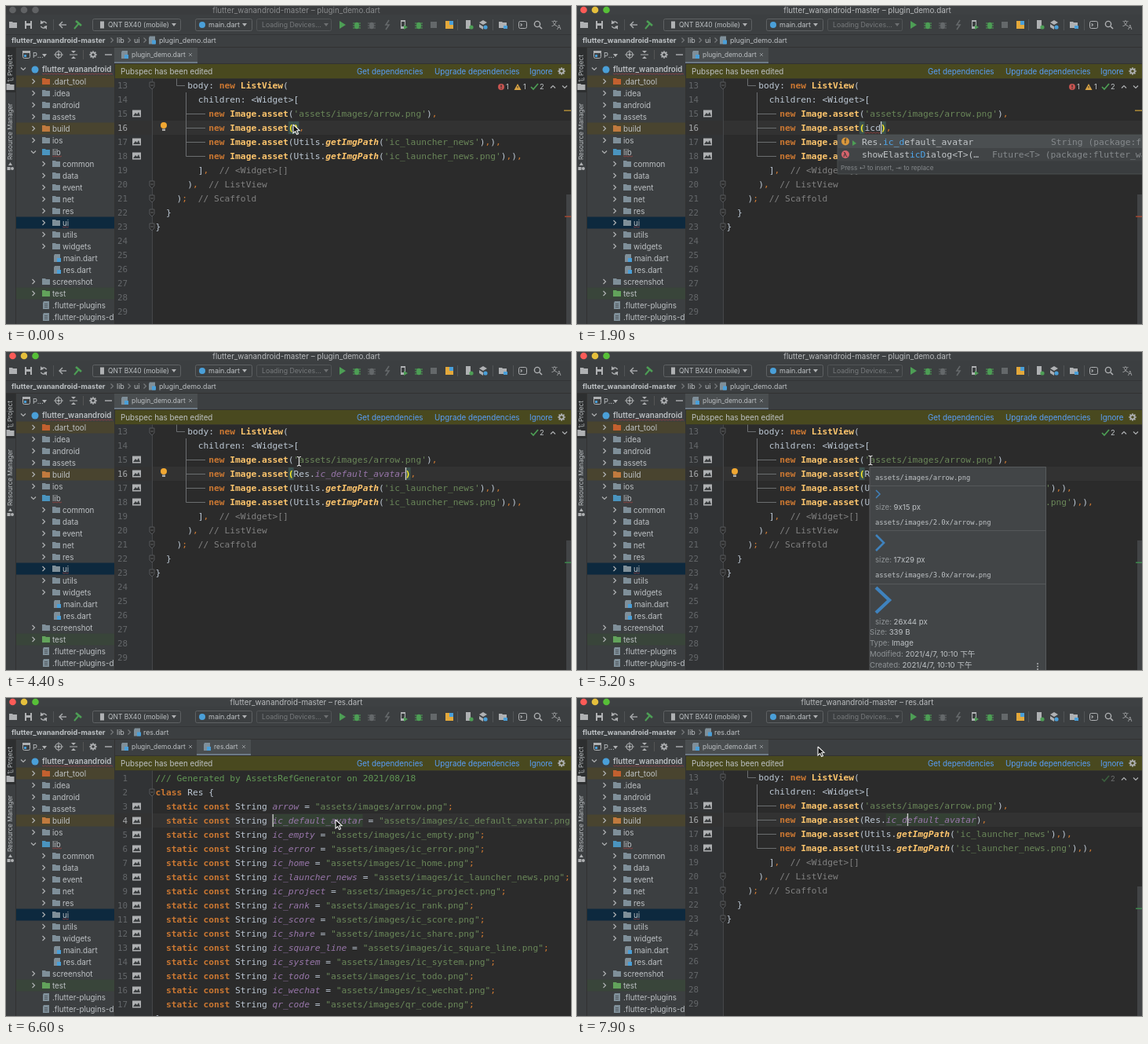
These frames come from a looping animation (720 px wide and 405 px high, 8000 ms). An HTML page with a canvas:

```html
<!DOCTYPE html>
<html lang="en">
<head>
<meta charset="utf-8">
<title>Editor demo</title>
<style>
html, body { margin: 0; width: 100%; height: 100%; overflow: hidden; background: #2b2b2b; }
canvas { display: block; }
</style>
</head>
<body>
<canvas id="stage" width="720" height="405"></canvas>
<script>
const g = document.getElementById('stage').getContext('2d');
const UI = 'Inter, "Liberation Sans", sans-serif';
const MONO = '"DejaVu Sans Mono", "Liberation Mono", monospace';
const CODE = 11.25, CW = 6.773, LEFT = 190.5;
const PANEL = '#3c3f41', TEXT = '#bdc1c4', DIM = '#8b8f92', ICON = '#afb1b3';
const BLUE = '#4a9fd8', GREEN = '#4d9e55', PLAIN = '#bcc7d3';

// moments of the session, in ms
const ACTIVE = 300, KEYS = [1500, 1650, 1800], ACCEPT = 2200, CHECKED = 3700;
const DOC_IN = 4800, DOC_OUT = 5450, OPEN = 6200, CLOSE = 7700, LOOP = 8000;

const MOUSE = [[0, 366, 151], [500, 366, 155], [3900, 366, 155], [4500, 374, 138],
  [5450, 374, 138], [5900, 420, 155], [6800, 420, 155], [7400, 303, 60], [7700, 303, 60], [7900, 307, 62]];

function rect(x, y, w, h, c) { g.fillStyle = c; g.fillRect(x, y, w, h); }
function box(x, y, w, h, c, fill) {
  g.beginPath(); g.roundRect(x, y, w, h, 2);
  if (fill) { g.fillStyle = fill; g.fill(); }
  g.strokeStyle = c; g.lineWidth = 1; g.stroke();
}
function dot(x, y, r, c) { g.fillStyle = c; g.beginPath(); g.arc(x, y, r, 0, 7); g.fill(); }
function ring(x, y, r, c, w = 1.2) {
  g.strokeStyle = c; g.lineWidth = w; g.beginPath(); g.arc(x, y, r, 0, 7); g.stroke();
}
function trace(p) {
  g.beginPath();
  for (let i = 0; i < p.length; i += 2) g.lineTo(p[i], p[i + 1]);
}
function line(p, c, w = 1) { trace(p); g.strokeStyle = c; g.lineWidth = w; g.stroke(); }
function poly(p, c) { trace(p); g.fillStyle = c; g.fill(); }
function text(s, x, y, size = 9.8, c = TEXT, style = '', align = 'left', family = UI) {
  g.font = `${style} ${size}px ${family}`;
  g.textAlign = align;
  g.fillStyle = c;
  g.fillText(s, x, y + size * .36);
}
function mono(s, x, y, c, size = CODE, style = '', align = 'left') { text(s, x, y, size, c, style, align, MONO); }
function wave(x, y, w) {
  const p = [];
  for (let i = 0; i <= w; i += 2) p.push(x + i, y + (i % 4 ? 1 : 0));
  line(p, '#9a4340', .8);
}
function chevron(x, y, r, c, dir = 'right') {
  const h = r / 2;
  line({ right: [x - h, y - r, x + h, y, x - h, y + r], down: [x - r, y - h, x, y + h, x + r, y - h],
    up: [x - r, y + h, x, y - h, x + r, y + h] }[dir], c, 1.2);
}
function arrowDown(x, y) { poly([x - 3, y - 2, x + 3, y - 2, x, y + 2], ICON); }
function folder(x, y, c = '#7f8f99') {
  poly([x - 5, y - 4, x - 1, y - 4, x, y - 3, x + 5, y - 3, x + 5, y + 4, x - 5, y + 4], c);
}
function file(x, y, c) {
  poly([x - 3, y - 5, x + 4, y - 5, x + 4, y + 5, x - 4, y + 5, x - 4, y - 3], '#7f8f99');
  if (c) rect(x, y, 5, 5, c);
  else for (let i = -2; i < 4; i += 2) rect(x - 2, y + i, 4, .8, '#4a5055');
}
function cross(x, y) {
  line([x - 2, y - 2, x + 2, y + 2], DIM);
  line([x + 2, y - 2, x - 2, y + 2], DIM);
}
function gear(x, y) {
  for (let i = 0; i < 8; i++) {
    const a = i * Math.PI / 4, u = Math.cos(a), v = Math.sin(a);
    line([x + 3 * u, y + 3 * v, x + 4.8 * u, y + 4.8 * v], ICON, 1.6);
  }
  ring(x, y, 2.7, ICON, 1.8);
}
function bug(x, y, c) {
  g.fillStyle = c; g.beginPath(); g.ellipse(x, y + 1, 3, 4.2, 0, 0, 7); g.fill();
  for (const d of [-2, 1, 4]) line([x - 5, y + d, x + 5, y + d], c);
}
function picture(y) {
  rect(161, y - 4.5, 11, 9, ICON);
  poly([162, y + 3, 165, y - 1, 167, y + 1, 169, y - 2, 171, y + 3], '#3a3d3f');
}

function titleBar(t) {
  const on = t >= ACTIVE;
  rect(0, 0, 720, 405, PANEL);
  rect(0, 0, 720, 11, on ? '#3e4143' : '#3a3c3e');
  ['#fc5b57', '#e5bf3c', '#57c038'].forEach((c, i) => dot(8.5 + i * 14.5, 5, 4.3, on ? c : '#606264'));
  const name = t < OPEN ? 'plugin_demo.dart' : 'res.dart';
  text(`flutter_wanandroid-master – ${name}`, 370, 5.5, 9.8, on ? '#b9bbbd' : '#898b8d', '', 'center');
}

function toolbar() {
  folder(9, 24, ICON);
  rect(24, 19, 9, 10, ICON); rect(26, 19, 5, 3, PANEL); rect(26, 25, 5, 4, PANEL);
  g.strokeStyle = ICON; g.lineWidth = 1.4;
  for (const a of [.3, 3.44]) { g.beginPath(); g.arc(48, 24, 4, a, a + 2.4); g.stroke(); }
  poly([44, 18, 44, 23, 48, 22], ICON); poly([52, 30, 52, 25, 48, 26], ICON);
  line([77, 24, 68, 24], ICON, 1.3); line([72, 20, 68, 24, 72, 28], ICON, 1.3);
  line([87, 29, 93, 22], GREEN, 2); line([89, 19, 96, 25], GREEN, 2.6);
  for (const x of [60, 575, 620, 646]) rect(x, 17, 1, 14, '#515456');
  box(110.5, 16.5, 112, 15, '#5e6163'); rect(120, 19.5, 5, 9, ICON);
  text('QNT BX40 (mobile)', 130, 24, 8.5); arrowDown(214, 24);
  box(241.5, 16.5, 72, 15, '#5e6163'); dot(250, 24, 4, BLUE);
  text('main.dart', 258, 24, 9); arrowDown(304, 24);
  box(319.5, 16.5, 95, 15, '#515456'); text('Loading Devices...', 326, 24, 8.7, '#777a7c');
  poly([405, 22, 411, 22, 408, 26], '#6d7072');
  poly([425, 19, 433, 24, 425, 29], GREEN);
  bug(447, 24, GREEN);
  const grey = '#64686a';
  bug(466, 24, grey); line([488, 18, 484, 24, 488, 24, 484, 30], grey, 1.6);
  rect(503, 18, 6, 11, ICON); rect(504, 20, 4, 6, PANEL); poly([507, 24, 512, 27, 507, 30], GREEN);
  bug(526, 24, GREEN); rect(541, 20, 8, 8, grey);
  rect(560, 19, 10, 10, '#e3a83b'); rect(565, 19, 5, 5, BLUE);
  rect(586, 18, 6, 11, ICON); dot(593, 27, 2.6, GREEN);
  poly([608, 18, 613, 21, 608, 24, 603, 21], ICON); poly([603, 23, 608, 26, 608, 30, 603, 27], ICON); dot(611, 27, 2.6, BLUE);
  folder(633, 24, ICON); rect(634, 25, 5, 4, BLUE);
  box(653.5, 19.5, 10, 9, ICON); chevron(656.5, 24, 1.7, ICON);
  ring(677, 23, 3.6, ICON, 1.4); line([680, 26, 683, 29], ICON, 1.6);
  text('文', 695, 22, 8, ICON, '', 'left', '"Noto Sans CJK SC", "Noto Sans CJK", sans-serif');
  text('A', 702, 27, 8, ICON);
}

function breadcrumbs(t) {
  const pathChevron = x => chevron(x, 43.5, 3, '#777a7c');
  rect(0, 36, 720, 1, '#333537');
  text('flutter_wanandroid-master', 7, 43.5, 9.1, TEXT, 'bold');
  text('lib', 141, 43.5, 9);
  [135, 157].forEach(pathChevron);
  if (t < OPEN) {
    text('ui', 163, 43.5, 9);
    pathChevron(177);
    file(186, 43.5, BLUE); text('plugin_demo.dart', 195, 43.5, 8.9);
  } else {
    file(167, 43.5, BLUE); text('res.dart', 175, 43.5, 8.9);
  }
  rect(0, 52, 720, 1, '#323232');
}

function sideStripe() {
  rect(0, 53, 12, 57, '#2d2f30');
  rect(12, 53, 1, 352, '#323232');
  for (const [s, y] of [['1: Project', 97], ['Resource Manager', 196]]) {
    g.save(); g.translate(5.5, y); g.rotate(-Math.PI / 2); text(s, 0, 0, 8.1); g.restore();
  }
  rect(8.5, 91, .7, 4, TEXT);
  folder(5.5, 103, ICON);
  poly([5.5, 199, 8, 203, 3, 203], ICON); rect(1.5, 205, 4, 4, ICON); dot(8, 207, 2, ICON);
}

const TREE = `.dart_tool .idea android assets build ios lib
common data event net res ui utils widgets main.dart res.dart
screenshot test .flutter-plugins .flutter-plugins-d`.split(/\s+/);
const ROW_TINT = { '.dart_tool': '#49442f', build: '#49442f', ui: '#0d293e', test: '#39453a' };
const FOLDER_TINT = { '.dart_tool': '#c2602f', build: '#c07a3e', lib: '#4a94bf', test: '#62a35b' };

function projectTree() {
  box(21.5, 57.5, 9, 9, ICON); rect(21, 57, 10, 3, ICON); rect(23, 62, 3, 3, BLUE);
  text('P...', 34, 62.5, 9.4); arrowDown(49, 63);
  ring(67, 62, 4, ICON); dot(67, 62, 1.4, ICON);
  line([67, 56, 67, 68], ICON, .8); line([61, 62, 73, 62], ICON, .8);
  line([81, 62, 91, 62], ICON); poly([83, 57, 89, 57, 86, 60], ICON); poly([83, 67, 89, 67, 86, 64], ICON);
  rect(98, 56, 1, 12, '#555'); gear(111, 62); line([126, 62, 135, 62], ICON, 1.4);
  g.save(); g.beginPath(); g.rect(13, 72, 125, 333); g.clip();
  chevron(22, 80, 3, ICON, 'down'); dot(37, 81, 4.5, BLUE);
  text('flutter_wanandroid', 46, 81, 9.7, TEXT, '600'); wave(46, 86, 91);
  TREE.forEach((name, i) => {
    const y = 96 + i * 15, deep = i > 6 && i < 17, leaf = /main|res\.|flutter/.test(name);
    if (ROW_TINT[name]) rect(13, y - 7.5, 125, 15, ROW_TINT[name]);
    if (leaf) file(deep ? 65 : 51, y, deep && BLUE);
    else {
      chevron(deep ? 48 : 35, y, 3, ICON, name === 'lib' ? 'down' : 'right');
      folder(deep ? 64 : 51, y, FOLDER_TINT[name]);
    }
    text(name, leaf && deep ? 73 : deep ? 72 : 59, y, 9.8);
    if (name === 'lib') wave(59, y + 5, 12);
    if (name === 'ui') wave(72, y + 5, 9);
  });
  g.restore();
}

function tabs(both) {
  const tab = (x, w, name, on) => {
    if (on) { rect(x, 53, w, 20, '#4a4e50'); rect(x, 71, w, 2, '#6d7a86'); }
    file(x + 13, 62, BLUE); text(name, x + 22, 62, 8.4); cross(x + w - 9, 62);
  };
  rect(138, 53, 1, 352, '#323232');
  tab(138, 106, 'plugin_demo.dart', !both);
  if (both) tab(243, 69, 'res.dart', true);
  rect(139, 73, 581, 1, '#323232');
  rect(139, 74, 581, 18.5, '#49491f');
  text('Pubspec has been edited', 146, 83);
  text('Get dependencies', 447, 83, 9.8, '#589df6');
  text('Upgrade dependencies', 546, 83, 9.8, '#589df6');
  text('Ignore', 667, 83, 9.8, '#589df6');
  gear(708, 83);
}

const TOKEN = /\/\/.*|'[^']*'|"[^"]*"|Image\.asset|\w+|[^\w\s]/g;
function look(s) {
  if (s.startsWith('///')) return ['#629755'];
  if (s.startsWith('//')) return ['#808080'];
  if (/^['"]/.test(s)) return ['#6a8759'];
  if (/^(new|class|static|const)$/.test(s)) return ['#cc7832', 'bold'];
  if (/^[,;]$/.test(s)) return ['#cc7832'];
  if (/^(Image\.asset|ListView)$/.test(s)) return ['#ffc66d', 'bold'];
  if (s === 'getImgPath') return ['#ffc66d', 'italic bold'];
  if (/^(arrow|qr_code|ic_\w+)$/.test(s)) return ['#9876aa', 'italic'];
  return [PLAIN];
}
function code(s, y) {
  for (const m of s.matchAll(TOKEN)) {
    const [c, style] = look(m[0]);
    mono(m[0], LEFT + m.index * CW, y, c, CODE, style);
  }
}
const col = n => LEFT + n * CW;

function editorBase(first, top, count, current) {
  rect(139, 92.5, 581, 312.5, '#2b2b2b');
  rect(139, 92.5, 47, 312.5, '#313335');
  const y = top + (current - first) * 18;
  rect(139, y - 9, 581, 18, '#323232');
  rect(186, 92.5, 1, 312.5, '#454749');
  for (let i = 0; i < count; i++)
    mono(first + i, 155, top + i * 18, first + i === current ? '#a7a9ab' : '#64676a', 10.8, '', 'right');
}
function fold(y) {
  poly([183, y - 4, 189, y - 4, 189, y + 2, 186, y + 5, 183, y + 2], '#2b2b2b');
  line([183, y - 4, 189, y - 4, 189, y + 2, 186, y + 5, 183, y + 2, 183, y - 4], '#606366', .8);
  line([184.5, y, 187.5, y], '#777a7c', .8);
}
function paren(s, n, y) {
  rect(col(n), y - 8, CW, 16, '#3b514d');
  mono(s, col(n), y, '#ffef28', CODE, 'bold');
}
function caret(x, y, t, since) {
  if (Math.floor((t - since) / 500) % 2 === 0) rect(x, y - 8, 1.3, 16, '#d0d0d0');
}

function inspections(t) {
  g.globalAlpha = t >= CLOSE || (t >= ACCEPT && t < CHECKED) ? .45 : 1;
  if (t < CHECKED) {
    dot(631, 103, 4, '#c75450'); rect(630.4, 100.5, 1.3, 3, '#333'); rect(630.4, 104.5, 1.3, 1.2, '#333');
    text('1', 637, 103, 9.3);
    poly([652, 99, 656.5, 107, 647.5, 107], '#d9a343'); rect(651.5, 102, 1, 2.5, '#333');
    text('1', 659, 103, 9.3);
  }
  line([669, 103, 672, 106, 678, 99], GREEN, 1.7); text('2', 680, 103, 9.3);
  g.globalAlpha = 1;
  chevron(697, 103, 3, ICON, 'up'); chevron(712, 103, 3, ICON, 'down');
  rect(714, 240, 6, 165, '#424446');
  if (t < ACCEPT) rect(711, 132.5, 9, 1.3, '#c29a38');
  rect(712, 267.5, 8, 1.3, t < ACCEPT ? '#b3492f' : '#3f9450');
}

function demoFile(t) {
  editorBase(13, 101, 17, 16);
  const typed = KEYS.filter(k => t >= k).length;
  const arg = t >= ACCEPT ? 'Res.ic_default_avatar' : 'icd'.slice(0, typed);
  const back = t >= CLOSE;
  line([217.5, 92.5, 217.5, 101.5, 228, 101.5], '#6b6e70');
  line([229.5, 110, 229.5, 191.5], '#6b6e70');
  for (let i = 0; i < 4; i++) line([229.5, 137.5 + i * 18, 254, 137.5 + i * 18], '#6b6e70');
  if (back) rect(col(30), 147, 17 * CW, 16, '#344134');
  [
    '      body: new ListView(',
    '        children: <Widget>[',
    "          new Image.asset('assets/images/arrow.png'),",
    `          new Image.asset(${arg}),`,
    "          new Image.asset(Utils.getImgPath('ic_launcher_news'),),",
    "          new Image.asset(Utils.getImgPath('ic_launcher_news.png'),),",
    '        ],  // <Widget>[]', '      ),  // ListView', '    );  // Scaffold', '  }', '}'
  ].forEach((s, i) => code(s, 101 + i * 18));
  [101, 227, 245, 263, 281].forEach(fold);
  [137, 173, 191].forEach(picture);
  if (t >= 2400) picture(155);
  const end = 26 + arg.length;
  if (!back) { paren('(', 25, 155); paren(')', end, 155); }
  if (arg && t < ACCEPT) wave(col(26), 161, arg.length * CW);
  const since = back ? CLOSE : t >= ACCEPT ? ACCEPT : typed ? KEYS[typed - 1] : ACTIVE;
  if (t >= ACTIVE) caret(back ? col(34) : col(end), 155, t, since);
  if (t < KEYS[0] || (t >= CHECKED && !back)) {
    dot(201, 152, 4, '#f0a732'); rect(199, 156.5, 4, 2.5, '#a9a9a9');
  }
  inspections(t);
  if (t >= KEYS[1] && t < ACCEPT) completion(typed);
  if (t >= DOC_IN && t < DOC_OUT) documentation();
}

function completion(typed) {
  const list = '#414446', picked = '#4b4f51';
  rect(332, 164, 388, 50, list);
  rect(332, 164, 388, 17, picked);
  rect(332, 197.5, 388, 16.5, '#3a3d3f');
  line([720, 164, 332, 164, 332, 214, 720, 214], '#505355', .8);
  // the part of the name that matches the typed letters is blue
  const row = (y, bg, s, at, len, type, x, c, mark) => {
    dot(342, y, 5, c); text(mark, 342, y, 8, '#333', '600', 'center');
    mono(s, 363, y, '#c3c7ca');
    rect(363 + at * CW, y - 7, len * CW, 14, bg);
    mono(s.substr(at, len), 363 + at * CW, y, '#4fa6ea');
    mono(type, x, y, '#85898c');
  };
  row(172.5, picked, 'Res.ic_default_avatar', 4, typed + 1, 'String (package:flutter_wa', 604, '#d9973b', 'f');
  row(189, list, 'showElasticDialog<T>(…', 9, typed, 'Future<T> (package:flutter_wa', 529, '#d5636c', 'λ');
  poly([351, 171, 356, 175, 351, 178], GREEN);
  text('Press ⏎ to insert, ⇥ to replace', 336, 206, 8.1, '#85898c');
}

function label(key, value, x, y) {
  text(key, x, y, 9.6, '#8f9396');
  const w = g.measureText(key + ' ').width;
  text(value, x + w, y, 9.6, '#bfc3c6', '', 'left', 'Inter, "Noto Sans CJK SC", "Noto Sans CJK", sans-serif');
}
function documentation() {
  rect(373, 146, 225, 259, '#424547');
  line([373, 405, 373, 146.5, 597.5, 146.5, 597.5, 405], '#56595b');
  // folder, header, separator, icon top, icon size, caption
  [['', 160, 170.5, 176, 6, 10, 198, '9x15'], ['2.0x/', 217, 227.5, 233, 11, 20, 265, '17x29'],
    ['3.0x/', 284, 295.5, 300, 18, 32, 344, '26x44']].forEach(([dir, y, rule, top, w, h, cap, size]) => {
    mono(`assets/images/${dir}arrow.png`, 380, y, '#bfc3c6', 8.75);
    line([373, rule, 597, rule], '#55585a');
    line([381, top, 380 + w, top + h / 2, 381, top + h], '#3f82bd', w / 4.2);
    label('size:', size + ' px', 380, cap);
  });
  [['Size:', '339 B'], ['Type:', 'Image'], ['Modified:', '2021/4/7, 10:10 下午'], ['Created:', '2021/4/7, 10:10 下午']]
    .forEach(([k, v], i) => label(k, v, 373, 357 + i * 14));
  [397, 400.5, 404].forEach(y => dot(587, y, 1, ICON));
}

const ASSETS = ['arrow', ...'default_avatar empty error home launcher_news project rank score share square_line system todo wechat'
  .split(' ').map(s => 'ic_' + s), 'qr_code'];

function resFile(t) {
  editorBase(1, 102, 17, 4);
  rect(col(22), 148, 17 * CW, 16, '#344134');
  code('/// Generated by AssetsRefGenerator on 2021/08/18', 102);
  code('class Res {', 120);
  fold(120);
  ASSETS.forEach((name, i) => {
    const y = 138 + i * 18;
    code(`  static const String ${name} = "assets/images/${name}.png";`, y);
    picture(y);
  });
  code('}', 408);
  caret(col(22), 156, t, OPEN);
}

function mouse(t) {
  if (t >= 1400 && t < 3900) return;
  let i = 0;
  while (i < MOUSE.length - 2 && t > MOUSE[i + 1][0]) i++;
  const [t0, x0, y0] = MOUSE[i], [t1, x1, y1] = MOUSE[i + 1];
  const k = Math.min(1, (t - t0) / (t1 - t0)), e = k * k * (3 - 2 * k);
  const x = x0 + (x1 - x0) * e, y = y0 + (y1 - y0) * e;
  if (t < 500 || t >= 5800) {
    trace([x, y, x, y + 11, x + 2.7, y + 8.6, x + 4.6, y + 12.6, x + 6.5, y + 11.7, x + 4.7, y + 7.8, x + 8, y + 7.6, x, y]);
    g.fillStyle = '#111'; g.fill();
    g.strokeStyle = '#f2f2f2'; g.lineWidth = 1.1; g.stroke();
  } else {
    for (const [c, w] of [['#222', 2.6], ['#eee', 1.1]]) {
      line([x, y - 5, x, y + 5], c, w);
      line([x - 2.5, y - 6, x, y - 5, x + 2.5, y - 6], c, w);
      line([x - 2.5, y + 6, x, y + 5, x + 2.5, y + 6], c, w);
    }
  }
}

function frame(now) {
  const t = now % LOOP, inRes = t >= OPEN && t < CLOSE;
  titleBar(t);
  toolbar();
  breadcrumbs(t);
  sideStripe();
  projectTree();
  tabs(inRes);
  if (inRes) resFile(t); else demoFile(t);
  mouse(t);
  requestAnimationFrame(frame);
}
requestAnimationFrame(frame);
</script>
</body>
</html>
```
